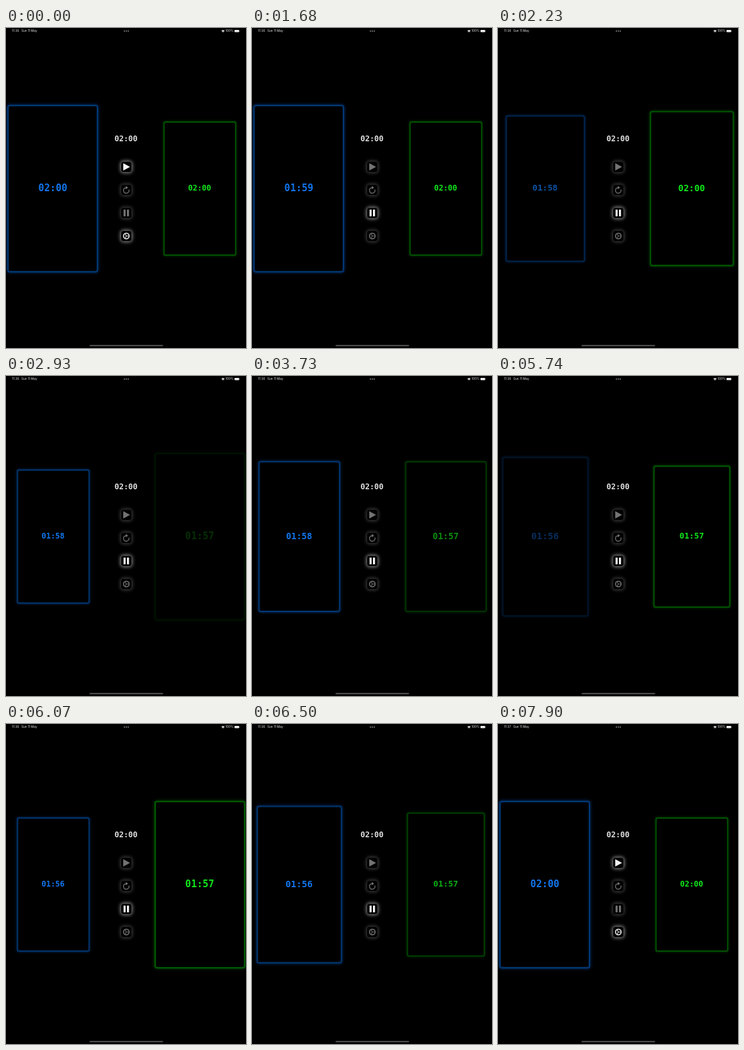
An HTML page that plays this animation: 375x500 px, repeating every 8 s.

```html
<!DOCTYPE html>
<html lang="en">
<head>
<meta charset="utf-8">
<title>Game clock</title>
<style>
html, body { margin: 0; width: 100%; height: 100%; overflow: hidden; background: #000; }
#stage { position: relative; width: 375px; height: 500px; overflow: hidden; background: #000; }
svg { position: absolute; left: 0; top: 0; overflow: visible; }
.panel, .total {
  position: absolute; box-sizing: border-box; padding-bottom: 1px;
  display: flex; align-items: center; justify-content: center;
  font: 700 15px "DejaVu Sans Mono", "Noto Sans Mono", monospace;
}
.panel { top: 120px; width: 141px; height: 261px; color: var(--ink); }
.panel::before {
  content: ""; position: absolute; inset: -.5px;
  border: 2px solid var(--line); border-radius: 4px;
  box-shadow: 0 0 4px 1px var(--glow), inset 0 0 3px var(--glow);
  filter: blur(.6px);
}
#blue { left: 2.7px; --ink: #1275ec; --line: #003a78; --glow: rgba(0, 75, 160, .5); }
#green { left: 232.2px; --ink: #10e41a; --line: #005c00; --glow: rgba(0, 115, 0, .45); }
.total { left: 157px; top: 164px; width: 61px; height: 19px; font-size: 12px; color: #ddd; }
.btn {
  position: absolute; left: 180px; width: 16px; height: 16px;
  border-radius: 4px; background: #000;
  box-shadow: 0 0 5px 2px rgba(255, 255, 255, .45);
}
.btn svg { width: 16px; height: 16px; fill: #f4f4f4; }
.stroke { fill: none; stroke: #ddd; stroke-width: 1.5; }
#status { font: 500 4.7px Inter, "Liberation Sans", sans-serif; fill: #c4c4c4; }
</style>
</head>
<body>
<div id="stage">
  <svg id="status" width="375" height="500" viewBox="0 0 375 500">
    <text id="clock" x="9.3" y="6.4">11:36</text>
    <text x="24" y="6.4">Sun 11 May</text>
    <g fill="#888"><circle cx="185" cy="4.7" r="1"/><circle cx="188" cy="4.7" r="1"/><circle cx="191" cy="4.7" r="1"/></g>
    <path d="M336.5 4.2A3.7 3.7 0 0 1 341.7 4.2L339.1 7Z"/>
    <text x="343" y="6.4">100%</text>
    <rect x="357" y="3" width="7.3" height="3.6" rx="1" fill="#eee"/>
    <rect x="364.7" y="4.1" width=".6" height="1.4" rx=".3"/>
    <rect x="130.5" y="495.3" width="115" height="2" rx="1" fill="#555"/>
  </svg>

  <div class="panel" id="blue">02:00</div>
  <div class="panel" id="green">02:00</div>
  <div class="total">02:00</div>

  <div class="btn" id="play" style="top:209px"><svg viewBox="-8 -8 16 16">
    <path id="single" d="M-4.8-5.8L5.8 0L-4.8 5.8Z"/>
    <path id="double" d="M-5.6-3.9L.2 0L-5.6 3.9ZM.2-3.9L6.2 0L.2 3.9Z"/>
  </svg></div>
  <div class="btn" id="reset" style="top:245px"><svg viewBox="-8 -8 16 16">
    <path class="stroke" d="M4.1-.6A4.4 4.4 0 1 1 0-3.6"/>
    <path d="M-.8-6.2L2.8-3.6L-.8-1Z"/>
  </svg></div>
  <div class="btn" id="pause" style="top:281px"><svg viewBox="-8 -8 16 16">
    <path d="M-4.3-5.3h3.2v10.6h-3.2ZM1-5.3h3.2v10.6h-3.2Z"/>
  </svg></div>
  <div class="btn" id="gear" style="top:317px"><svg viewBox="-8 -8 16 16">
    <circle class="stroke" r="4.4" style="stroke-width:1.8"/>
    <path class="stroke" d="M0 0H4M0 0L-2-3.5M0 0L-2 3.5" style="stroke-width:1.1"/>
  </svg></div>
</div>
<script>
const LOOP = 8000, RESET = 7700, SMALL = .8, PRESSED = .2, DIM = .47;

// The player's panel is pressed, released, and the two panels have swapped size.
const turns = [
  { side: "blue", press: 1680, release: 1980, end: 2380 },
  { side: "green", press: 2600, release: 3540, end: 3920 },
  { side: "blue", press: 5500, release: 5640, end: 6070 },
  { side: "green", press: 6230, release: 6360, end: 6560 }
];
// Moments when a player loses a second.
const ticks = { blue: [1300, 1860, 4180, 5560], green: [2320, 2630, 2830] };

const lit = { idle: ["play", "gear"], running: ["pause"], paused: ["play", "reset", "gear"] };
const modes = [[0, "idle"], [1200, "running"], [4180, "paused"],
  [5060, "running"], [6870, "paused"], [RESET, "idle"]];
const taps = { play: [1200, 4740], reset: [7520], pause: [4180, 6870], gear: [] };

const $ = id => document.getElementById(id);
const ramp = (t, from, to) => Math.min(1, Math.max(0, (t - from) / (to - from)));
const mix = (a, b, u) => a + (b - a) * u;
const mmss = s => [Math.floor(s / 60), s % 60].map(n => String(n).padStart(2, "0")).join(":");

function blueSize(t) {
  return turns.reduce((size, { side, release, end }) =>
    mix(size, side === "blue" ? SMALL : 1, ramp(t, release, end)), 1);
}

function panelFade(side, t) {
  return Math.min(...turns.filter(turn => turn.side === side).map(({ press, release, end }) => {
    const down = ramp(t, press, Math.min(release, press + 250));
    return mix(1, PRESSED, down * (1 - ramp(t, release, end)));
  }));
}

function drawPanel(side, size, t) {
  const el = $(side);
  const lost = t < RESET ? ticks[side].filter(at => at <= t).length : 0;
  el.style.transform = `scale(${size})`;
  el.style.opacity = panelFade(side, t);
  el.textContent = mmss(120 - lost);
}

function drawButtons(t) {
  const i = modes.findLastIndex(([at]) => at <= t);
  const [since, mode] = modes[i];
  const before = modes[Math.max(0, i - 1)][1];
  for (const id in taps) {
    const level = name => lit[name].includes(id) ? 1 : DIM;
    $(id).style.opacity = mix(level(before), level(mode), ramp(t, since, since + 200));
    // A tapped icon dims at once and recovers.
    const tap = taps[id].findLast(at => at <= t) ?? -LOOP;
    $(id).firstChild.style.opacity = mix(.5, 1, ramp(t, tap, tap + 350));
  }
  $("single").style.opacity = mode === "paused" ? 0 : 1;
  $("double").style.opacity = mode === "paused" ? 1 : 0;
}

function draw(t) {
  const size = blueSize(t);
  drawPanel("blue", size, t);
  drawPanel("green", 1 + SMALL - size, t);
  drawButtons(t);
  $("clock").textContent = t < 6780 ? "11:36" : "11:37";
}

const begin = performance.now();
function frame() {
  draw((performance.now() - begin) % LOOP);
  requestAnimationFrame(frame);
}
frame();
</script>
</body>
</html>
```
